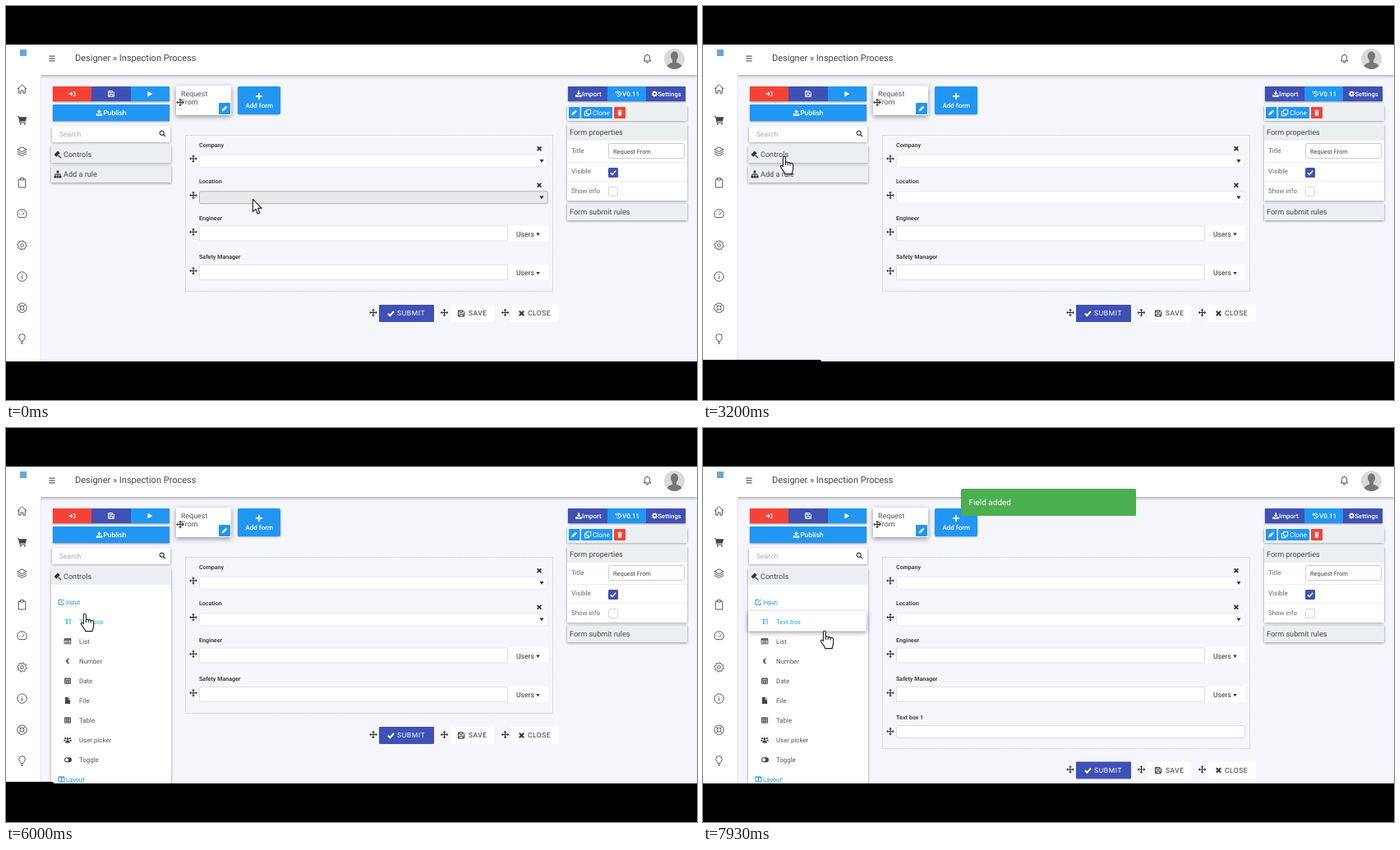
An HTML page with a canvas for the animation above (8000 ms loop, 841 by 480 pixels).

```html
<!DOCTYPE html>
<html lang="en">
<head>
<meta charset="utf-8">
<title>Form designer</title>
<style>
html, body { margin: 0; width: 100%; height: 100%; overflow: hidden; background: #000; }
canvas { display: block; width: 841px; height: 480px; }
</style>
</head>
<body>
<canvas id="stage" width="841" height="480"></canvas>
<script>
const c = document.getElementById('stage').getContext('2d');
c.textRendering = 'geometricPrecision';
const LOOP = 8000;
const BLUE = '#2196f3', INDIGO = '#3f51b5', RED = '#f44336', GREEN = '#4caf50';
const PAGE = '#f5f6fc', BAR = '#eceff1', INK = '#444', DARK = '#333';

const ring = (x, y, r) => `M${x - r} ${y}a${r} ${r} 0 1 0 ${2 * r} 0a${r} ${r} 0 1 0${-2 * r} 0`;

function gearPath(teeth, outer, inner, hole) {
  let d = '';
  for (let i = 0; i < teeth * 4; i++) {
    const a = (i + 0.5) * Math.PI / (teeth * 2), r = i % 4 < 2 ? outer : inner;
    d += (i ? 'L' : 'M') + (Math.cos(a) * r).toFixed(2) + ' ' + (Math.sin(a) * r).toFixed(2);
  }
  return d + 'Z' + ring(0, 0, hole);
}

// Icons are centred on 0,0 in a box of about 10 to 12 units.
const FILL = {
  move: 'M0-5L2-3H.6V-.6H3V-2L5 0L3 2V.6H.6V3H2L0 5L-2 3H-.6V.6H-3V2L-5 0L-3-2V-.6H-.6V-3H-2Z',
  pencil: 'M-4.5 4.5L-4 1.4L1-3.6L3.6-1L-1.4 4ZM1.6-4.2L2.6-5L5-2.6L4.2-1.6Z',
  cart: 'M-6-5H-4L-3.6-4H6L4.6 1.5H-2.4L-2 2.6H4.6V3.6H-3L-4.6-4H-6Z' + ring(-1.7, 5, 1) + ring(3.6, 5, 1),
  exit: 'M-5-1H-2V-3.5L1.5 0L-2 3.5V1H-5ZM1.5-4H5V4H1.5V2.8H3.8V-2.8H1.5Z',
  play: 'M-3.5-4.5L4.5 0L-3.5 4.5Z',
  upload: 'M0-5L3.5-1H1.2V2H-1.2V-1H-3.5ZM-5 1.5H-2V3H2V1.5H5V5H-5Z',
  download: 'M0 2L-3.5-1.5H-1.2V-5H1.2V-1.5H3.5ZM-5 1.5H-2V3H2V1.5H5V5H-5Z',
  gavel: 'M0-5L3-2L-2 3L-5 0ZM1 .5L5 4L4 5L0 1.5Z',
  tree: 'M-1.5-5H1.5V-2H.5V-.5H4V2H5V5H2V2H3V.5H.5V2H1.5V5H-1.5V2H-.5V.5H-3V2H-2V5H-5V2H-4V-.5H-.5V-2H-1.5Z',
  plus: 'M-1.1-5H1.1V-1.1H5V1.1H1.1V5H-1.1V1.1H-5V-1.1H-1.1Z',
  trash: 'M-4-4H-1.5V-5H1.5V-4H4V-3H-4ZM-3.3-2.3H3.3L2.8 5H-2.8Z',
  caret: 'M-3-2H3L0 2.6Z',
  gear: gearPath(8, 5, 3.7, 1.7),
  file: 'M-4-5H1V-1H4V5H-4ZM2-5L4-2H2Z',
  users: ring(0, -2, 2) + ring(-3.8, -2.6, 1.4) + ring(3.8, -2.6, 1.4) +
    'M-3.2 4.5V2Q-3 .4 0 .4T3.2 2V4.5ZM-6 2V0Q-5-1-3 0L-4 2ZM6 2V0Q5-1 3 0L4 2Z'
};
const LINE = {
  home: 'M-6 .3L0-5.5L6 .3M-4-1.5V5.5H-1.5V2H1.5V5.5H4V-1.5',
  layers: 'M0-5.5L6-2.5L0 .5L-6-2.5ZM-6 0L0 3L6 0M-6 2.5L0 5.5L6 2.5',
  board: 'M-2-4.5H-4.5V6H4.5V-4.5H2M-2-6H2V-3.5H-2Z',
  gauge: 'M-4 4.5A6 6 0 1 1 4 4.5ZM0 1.5L3-2M-4 0H-3M0-4V-3',
  cog: gearPath(8, 6, 4.7, 2),
  info: ring(0, 0, 6) + 'M0-.8V3.2M0-3.2V-2.2',
  buoy: ring(0, 0, 6) + ring(0, 0, 2.6) + 'M-4.2-4.2L-1.8-1.8M4.2-4.2L1.8-1.8M-4.2 4.2L-1.8 1.8M4.2 4.2L1.8 1.8',
  bulb: 'M-1.5 3C-1.5 1-4 0-4-2.5A4 4 0 0 1 4-2.5C4 0 1.5 1 1.5 3ZM-1.3 4.6H1.3M-.8 6H.8',
  bell: 'M-4.7 3.3C-3 2-3.5 0-3.5-1.5A3.5 3.5 0 0 1 3.5-1.5C3.5 0 3 2 4.7 3.3ZM-1.3 4.4A1.3 1.3 0 0 0 1.3 4.4M0-5V-6',
  floppy: 'M-4.4-4.4H2.5L4.4-2.5V4.4H-4.4ZM-2.4-4.4V-1.6H1.8V-4.4M-2.5 4.4V1H2.5V4.4',
  search: ring(-1, -1, 3.2) + 'M1.4 1.4L4.5 4.5',
  check: 'M-4 .3L-1.2 3L4-2.8',
  cross: 'M-3.2-3.2L3.2 3.2M3.2-3.2L-3.2 3.2',
  undo: 'M-3.6-2A4.2 4.2 0 1 1-3 3M-4.4-4.4V-1.4H-1.4M0-2V.6H2',
  copy: 'M-1.6-4.6H4.6V2H-1.6ZM-2-2H-4.6V4.6H2V2.4',
  edit: 'M1-3.6H-4.4V4.4H3.4V1M-1.4 1.4L4.4-4.4',
  menu: 'M-4-3.2H4M-4 0H4M-4 3.2H4',
  list: 'M-5-4H5V4H-5ZM-5-3H5M-5-2H5M-3.4 0H3.4M-3.4 2H3.4',
  date: 'M-4.4-3.6H4.4V4.6H-4.4ZM-4.4-2.6H4.4M-2.4-5V-3M2.4-5V-3M-4.4-.6H4.4M-4.4 2H4.4M-1.5-1V4.6M1.5-1V4.6',
  table: 'M-4.6-4H4.6V4H-4.6ZM-4.6-3.2H4.6M-4.6-1H4.6M-4.6 1.6H4.6M-1.5-4V4M1.5-4V4',
  columns: 'M-4.6-4H4.6V4H-4.6ZM-4.6-3H4.6M0-4V4'
};
const paths = {};
for (const k in FILL) paths[k] = new Path2D(FILL[k]);
for (const k in LINE) paths[k] = new Path2D(LINE[k]);

const ARROW = new Path2D('M.4 .4V15.6L4 12.3L6.4 18L8.9 17L6.5 11.4H11Z');
const HAND = new Path2D('M-1.6 1.8C-1.6-.2 1.4-.2 1.4 1.8V7.4C2.2 6.6 3.9 6.8 4.2 8C5 7.3 6.8 7.5 7.1 8.8' +
  'C8.2 8 10.6 8.4 10.6 10.6V15C10.6 18 9.2 18.6 9.2 21.6H.6C.6 19.4-3.2 15.8-4.5 13C-5.2 11-3 10.4-1.6 12.6Z' +
  'M1.4 7.4V11M4.2 8V11M7.1 8.8V11.4');

function icon(name, x, y, color = DARK, s = 1, w = 1) {
  c.save();
  c.translate(x, y);
  c.scale(s, s);
  if (name in FILL) {
    c.fillStyle = color;
    c.fill(paths[name], 'evenodd');
  } else {
    c.strokeStyle = color;
    c.lineWidth = w / s;
    c.stroke(paths[name]);
  }
  c.restore();
}

function box(x, y, w, h, fill, { r = 0, edge, shade = 0 } = {}) {
  c.save();
  c.beginPath();
  c.roundRect(x, y, w, h, r);
  if (shade) {
    c.shadowColor = 'rgba(0,0,0,.42)';
    c.shadowBlur = shade * 2;
    c.shadowOffsetY = shade / 2;
  }
  c.fillStyle = fill;
  c.fill();
  c.restore();
  if (edge) {
    c.strokeStyle = edge;
    c.lineWidth = 1;
    c.beginPath();
    c.roundRect(x + .5, y + .5, w - 1, h - 1, r);
    c.stroke();
  }
}

function text(s, x, y, size, color = INK, weight = 400, space = 0) {
  c.font = `${weight} ${size}px Roboto, Arial, sans-serif`;
  c.letterSpacing = space + 'px';
  c.fillStyle = color;
  c.fillText(s, x, y);
}

function clip(x, y, w, h, draw) {
  c.save();
  c.beginPath();
  c.rect(x, y, w, h);
  c.clip();
  draw();
  c.restore();
}

function header() {
  box(0, 47, 841, 37, '#fff', { shade: 2 });
  box(17, 53, 8, 8, '#6aa5de');
  icon('menu', 56, 64, DARK, .9);
  text('Designer » Inspection Process', 84, 67, 11);
  icon('bell', 780.5, 64, INK, .9);
  c.save();
  c.beginPath();
  c.arc(813.5, 64.5, 12.5, 0, 7);
  c.fillStyle = '#d9d9d9';
  c.fill();
  c.clip();
  c.fillStyle = '#777';
  c.beginPath();
  c.ellipse(813.5, 61, 4.6, 5.8, 0, 0, 7);
  c.ellipse(813.5, 76, 10, 7.5, 0, 0, 7);
  c.rect(811, 64, 5, 6);
  c.fill();
  c.restore();
}

function sidebar() {
  box(0, 84, 42, 349, '#fff');
  box(42, 84, 1, 349, '#e3e5ec');
  ['home', 'cart', 'layers', 'board', 'gauge', 'cog', 'info', 'buoy', 'bulb']
    .forEach((n, i) => icon(n, 19.5, 101 + i * 38.1, INK, .95, .9));
}

function toolbar() {
  box(57, 98, 142, 18, INDIGO, { shade: 1 });
  box(57, 98, 47, 18, RED);
  box(152, 98, 47, 18, BLUE);
  icon('exit', 80.5, 107, '#fff', .75);
  icon('floppy', 128, 107, '#fff', .75);
  icon('play', 175, 107, '#fff', .75);
  box(57, 120, 142, 20, BLUE, { shade: 1 });
  icon('upload', 113.5, 130, '#fff', .75);
  text('Publish', 118.5, 133, 8.4, '#fff', 500);
  box(56, 146, 144, 20, '#fff', { shade: 1.5 });
  text('Search', 65, 159, 8.5, '#aaa');
  icon('search', 190.5, 155.5, DARK, .8, 1.1);
}

const ITEMS = [['', 'Text box'], ['list', 'List'], ['', 'Number'], ['date', 'Date'],
  ['file', 'File'], ['table', 'Table'], ['users', 'User picker'], ['', 'Toggle']];

function item([name, label], i, hot) {
  const y = 235.7 + i * 24.07, ink = hot ? '#1fb5e0' : '#555';
  if (name) icon(name, 75, y, INK, .78, .9);
  if (i === 0) {
    c.font = 'bold 9px "Liberation Serif", serif';
    c.letterSpacing = '0px';
    c.fillStyle = hot ? ink : INK;
    c.fillText('T', 71, y + 3);
    c.fillRect(77.6, y - 3.5, 1, 7);
  }
  if (i === 2) text('€', 72.5, y + 3, 8.5, INK, 700);
  if (i === 7) {
    box(71, y - 3, 9, 6, INK, { r: 3 });
    box(72, y - 2, 4, 4, '#fff', { r: 2 });
  }
  text(label, 89, y + 2.9, 7.9, ink);
}

function controls(open, hot, lifted) {
  const h = open * 260;
  clip(43, 84, 165, 349, () => {
    if (h) {
      box(55, 171, 146, 20 + h, '#fff', { shade: 1.5 });
      clip(43, 190, 165, h, () => {
        icon('edit', 67.5, 212, BLUE, .75);
        text('Input', 73, 215, 7.6, BLUE);
        if (lifted) box(55, 223, 144, 24.5, '#fff', { shade: 3 });
        ITEMS.forEach((it, i) => item(it, i, hot && !i));
        icon('columns', 67.5, 428, BLUE, .75);
        text('Layout', 73, 430.5, 7.6, BLUE);
      });
    }
    box(55, 170, 146, 21, BAR, h ? {} : { shade: 1.5 });
    icon('gavel', 63, 181, DARK, .9);
    text('Controls', 70, 184, 9.1, INK);
    box(55, 194.5 + h, 146, 20.5, BAR, { shade: 1.5 });
    icon('tree', 63, 205 + h, DARK, .9);
    text('Add a rule', 70, 208 + h, 9.1, INK);
  });
}

function tabs() {
  box(207, 97, 67, 36, '#fff', { shade: 3 });
  text('Request', 213, 110, 8.9, '#555');
  text('From', 213, 120, 8.9, '#555');
  icon('move', 212, 117.5, DARK, .95);
  box(259, 118, 14, 14, BLUE, { r: 1 });
  icon('pencil', 266, 125, '#fff', .7);
  box(282, 98, 52, 34, BLUE, { r: 2, shade: 1 });
  icon('plus', 308, 110, '#fff', .8);
  text('Add form', 291.5, 124, 8, '#fff', 500);
}

function label(s, y) {
  text(s, 235, y, 7.1, INK, 700);
  icon('move', 228, y + 14.3, DARK, .95);
}

function choice(s, y, hot) {
  label(s, y);
  icon('cross', 649, y + 2, DARK, .75, 1.7);
  box(235, y + 9, 425, 16, hot ? '#e9e9e9' : '#fff', { r: 2, edge: hot ? '#b5b5b5' : '#e6e8ee' });
  icon('caret', 652, y + 17, DARK, .85);
}

function picker(s, y) {
  label(s, y);
  box(235, y + 6.5, 376, 19, '#fff', { edge: '#dfe1e7' });
  box(611, y + 6.5, 49, 19, '#fff', { r: 1 });
  text('Users', 621, y + 20, 8.6, DARK);
  icon('caret', 647.5, y + 17, DARK, .75);
}

function form(hot, added) {
  const grow = added ? 42.5 : 0;
  c.save();
  c.setLineDash([2, 1]);
  c.lineWidth = 1;
  c.strokeStyle = '#cdd0d8';
  c.strokeRect(218.5, 157.5, 447, 190 + Math.round(grow));
  c.restore();
  choice('Company', 171.7, false);
  choice('Location', 216.3, hot);
  picker('Engineer', 261);
  picker('Safety Manager', 308.4);
  if (added) {
    label('Text box 1', 355.4);
    box(235, 362, 425, 16, '#fff', { r: 2, edge: '#dcdee4' });
  }
  c.save();
  c.translate(0, grow);
  [447, 533.5, 607.5].forEach(x => icon('move', x, 373.5, DARK, .95));
  box(454, 364, 67, 21, INDIGO, { r: 1 });
  icon('check', 468.5, 374.5, '#fff', .9, 2);
  text('SUBMIT', 476, 377.4, 8.5, '#fff', 400, .6);
  box(541, 364, 53, 21, '#fff', { r: 1 });
  icon('floppy', 554, 374.5, DARK, .8);
  text('SAVE', 563, 377.4, 8.5, DARK, 400, .5);
  box(614, 364, 59, 21, '#fff', { r: 1 });
  icon('cross', 627.5, 374.5, DARK, .85, 1.9);
  text('CLOSE', 635, 377.4, 8.5, DARK, 400, .5);
  c.restore();
}

function properties() {
  box(684, 98, 143, 18, INDIGO, { shade: 1 });
  box(732, 98, 47, 18, BLUE);
  icon('download', 697, 107, '#fff', .75);
  text('Import', 701, 110, 7.9, '#fff', 500);
  icon('undo', 745.5, 107, '#fff', .7);
  text('V0.11', 750, 110, 8, '#fff', 500);
  icon('gear', 789.5, 107, '#fff', .75);
  text('Settings', 793.5, 110, 7.6, '#fff', 500);
  box(683, 121, 146, 19, BAR, { shade: 1.5 });
  box(685, 123, 13.5, 14, BLUE, { r: 1 });
  icon('pencil', 691.5, 130, '#fff', .7);
  box(700, 123, 38, 14, BLUE, { r: 1 });
  icon('copy', 708, 130, '#fff', .8);
  text('Clone', 714, 133, 8.2, '#fff');
  box(740, 123, 14, 14, RED, { r: 1 });
  icon('trash', 747, 130, '#fff', .7);
  box(683, 144, 146, 93, '#fff', { shade: 1.5 });
  box(683, 143, 146, 21, BAR);
  text('Form properties', 686, 156.5, 9.1);
  box(683, 190, 146, 1, '#eceef2');
  box(683, 213, 146, 1, '#eceef2');
  text('Title', 688, 179, 8, '#666');
  text('Visible', 688, 204, 8, '#666');
  text('Show info', 688, 228, 7.9, '#666');
  box(733, 167, 93, 19, '#fff', { r: 2, edge: '#c9ccd2' });
  text('Request From', 739, 179.5, 7.4);
  box(733, 197, 12, 12, INDIGO, { r: 1.5 });
  icon('check', 739, 203, '#fff', .8, 1.5);
  box(733, 220, 12, 12, '#fff', { r: 1.5, edge: '#d5d7dc' });
  box(683, 240.5, 146, 20.5, BAR, { shade: 1.5 });
  text('Form submit rules', 686, 253.8, 9.1);
}

function toast(t) {
  const u = Math.min(1, (t - 7165) / 300), e = 1 - (1 - u) ** 3, y = 39 + 35 * e;
  c.save();
  c.globalAlpha = e;
  box(314, y, 213, 33, GREEN, { r: 1.5 });
  text('Field added', 323.5, y + 19.8, 10, '#fff');
  c.restore();
}

// time, x, y of the pointer's hot spot
const ROUTE = [
  [0, 300, 235], [1533, 300, 235], [1867, 251, 227], [2400, 150, 198], [3200, 99, 183],
  [4067, 99, 183], [4333, 94, 190], [4933, 79, 202], [5267, 88, 214], [5333, 88, 214],
  [6000, 96, 226], [6467, 100, 236], [7667, 100, 236], [7933, 148, 247]
];

function pointerAt(t) {
  const i = ROUTE.findIndex(p => p[0] > t);
  if (i < 0) return ROUTE[ROUTE.length - 1].slice(1);
  const [t0, x0, y0] = ROUTE[i - 1], [t1, x1, y1] = ROUTE[i];
  const u = (t - t0) / (t1 - t0);
  return [x0 + (x1 - x0) * u, y0 + (y1 - y0) * u];
}

const within = (t, a, b) => t >= a && t < b;

function pointer(x, y, hand) {
  c.save();
  c.translate(Math.round(x), Math.round(y));
  c.fillStyle = '#fff';
  c.strokeStyle = '#222';
  c.lineWidth = 1.1;
  c.lineJoin = 'round';
  const shape = hand ? HAND : ARROW;
  c.fill(shape);
  c.stroke(shape);
  c.restore();
}

function draw(now) {
  const t = Math.floor((now + 7) * .015) / .015;
  const [x, y] = pointerAt(t);
  const onField = t < 2400 && x >= 235;
  const onControls = within(t, 2900, 4230);
  const onItem = t > 5400 && y >= 222.5;
  const open = Math.min(1, Math.max(0, (t - 3600) / 200));

  c.fillStyle = '#000';
  c.fillRect(0, 0, 841, 480);
  clip(0, 47, 841, 386, () => {
    box(0, 47, 841, 386, PAGE);
    header();
    sidebar();
    toolbar();
    controls(open, onItem, t > 6300);
    tabs();
    form(onField, t > 7190);
    properties();
    if (t > 7190) toast(t);
    const status = within(t, 2900, 4500) ? 144 : onItem && t < 6250 ? 58 : 0;
    if (status) box(-4, 431, status + 4, 8, '#000', { r: 2 });
    const hand = within(t, 60, 790) || (t > 1590 && onField) || onControls || onItem;
    pointer(x, y, hand);
  });
}

const start = performance.now();
function tick(now) {
  draw(Math.max(0, now - start) % LOOP);
  requestAnimationFrame(tick);
}
draw(0);
requestAnimationFrame(tick);
</script>
</body>
</html>
```
